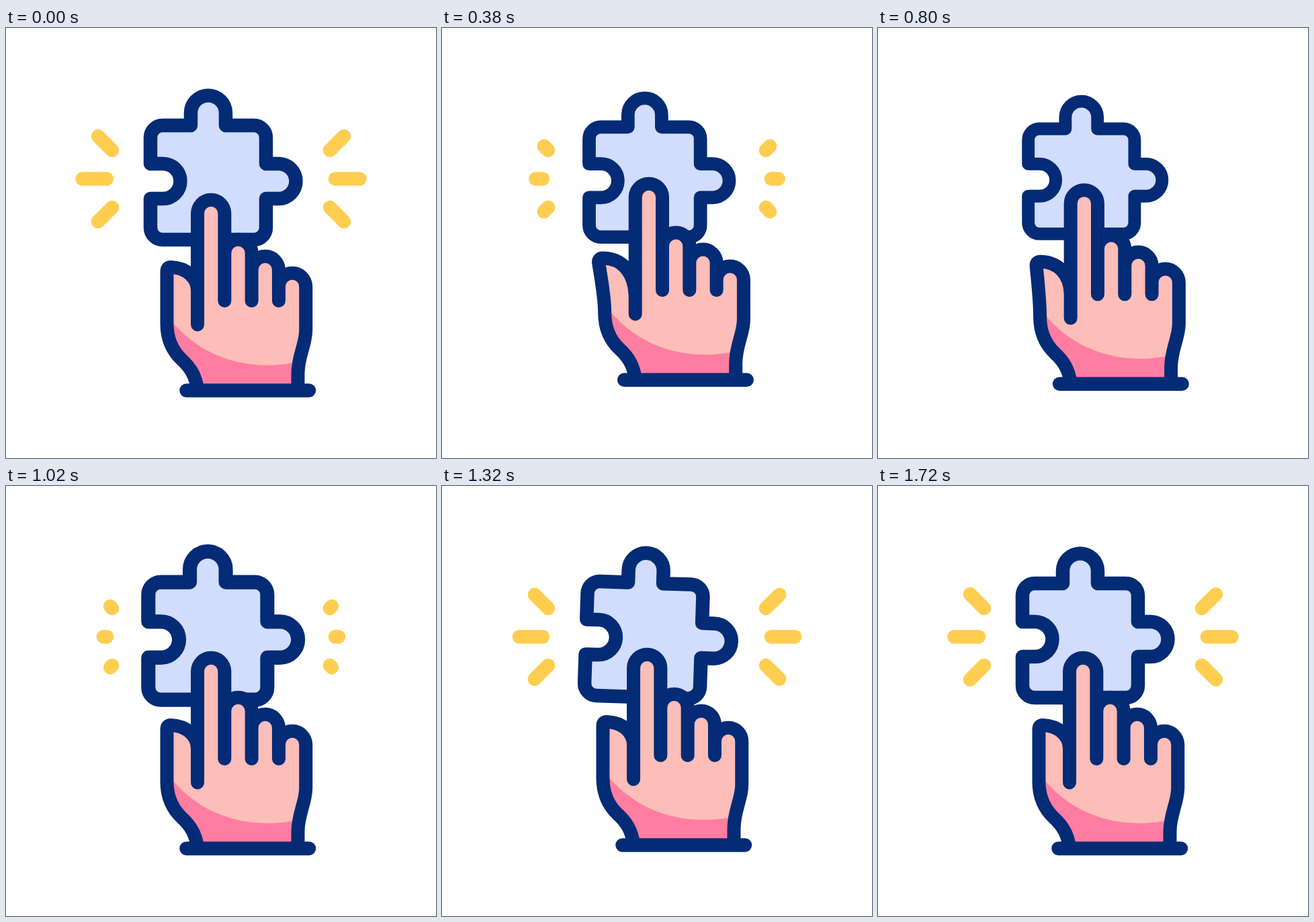
These frames come from a looping animation (640x640 px, 2200 ms). An HTML page with a canvas:

```html
<!DOCTYPE html>
<html lang="en">
<head>
<meta charset="utf-8">
<title>Hand and puzzle piece</title>
<style>
  html, body { margin: 0; width: 100%; height: 100%; overflow: hidden; background: #fff; }
  canvas { display: block; width: 100vmin; height: 100vmin; }
</style>
</head>
<body>
<canvas id="stage"></canvas>
<script>
const LOOP = 2200, SIZE = 640;
const NAVY = '#032b76', PIECE = '#d2dcfd', YELLOW = '#ffcd50', SKIN = '#fdbdb8', SHADE = '#ff7da0';
const PI = Math.PI;

const canvas = document.getElementById('stage');
const ctx = canvas.getContext('2d');

// Progress from 0 to 1 between two times, slightly eased at both ends.
function ramp(t, from, to) {
  const x = Math.min(1, Math.max(0, (t - from) / (to - from)));
  return 0.75 * x + 0.25 * x * x * (3 - 2 * x);
}

// Rises to 1 at the peak and falls back to 0.
const pulse = (t, from, peak, to) => ramp(t, from, peak) - ramp(t, peak, to);

function stroke(path, color, width) {
  ctx.strokeStyle = color;
  ctx.lineWidth = width;
  ctx.stroke(path);
}

function fill(path, color) {
  ctx.fillStyle = color;
  ctx.fill(path);
}

function piecePath() {
  const p = new Path2D();
  const left = 215, right = 387, top = 145, bottom = 315;
  const midX = (left + right) / 2, midY = 228, knob = 26, corner = 18, out = 18.5;
  p.moveTo(left, midY - knob);
  p.arcTo(left, top, midX, top, corner);
  p.lineTo(midX - knob, top);
  p.arc(midX, top - out, knob, PI, 0);
  p.lineTo(midX + knob, top);
  p.arcTo(right, top, right, midY, corner);
  p.lineTo(right, midY - knob);
  p.arc(right + out, midY, knob, -PI / 2, PI / 2);
  p.lineTo(right, midY + knob);
  p.arcTo(right, bottom, midX, bottom, corner);
  p.arcTo(left, bottom, left, midY, corner);
  p.lineTo(left, midY + knob);
  p.arc(left + out, midY, knob, PI / 2, -PI / 2, true);
  p.closePath();
  return p;
}

const piece = piecePath();
const shade = new Path2D('M240 428 C278 480 348 517 440 496 V540 H230 V428 Z');
const cuff = new Path2D('M268.5 539.5 H451');

// The reach stretches the index finger, curls the others and leans the thumb.
function handPath(reach) {
  const p = new Path2D();
  const r = 20.15, index = 305.2, inner = index - r;

  p.moveTo(285, 537);
  p.bezierCurveTo(282, 518, 275, 506, 262, 494);
  p.bezierCurveTo(247, 480, 239.5, 463, 239.5, 440);

  const tipX = 239.5 - 16.5 * reach, tipY = 362 + 9 * reach;
  p.bezierCurveTo(239.5, 417, tipX + 8 * reach, tipY + 26, tipX, tipY);
  p.quadraticCurveTo(tipX - 3.5 * reach, tipY - 6.5 - 4.5 * reach, tipX + 6.5 + 1.5 * reach, tipY - 6 - 4.5 * reach);
  p.bezierCurveTo(268 - 6 * reach, 357 + 4 * reach, inner - 2.5 * reach, 371 + 14 * reach, inner, 391 + 44 * reach);
  p.lineTo(inner, 441.5);

  for (let i = 0; i < 4; i++) {
    const x = index + i * 2 * r;
    const y = i ? 310 + 25 * i + 10.3 * reach : 276 - 15.5 * reach;
    p.arc(x, y, r, PI, 0);
    p.lineTo(x + r, i < 3 ? 406 : 450);
  }
  p.bezierCurveTo(446, 472, 434.5, 488, 434.5, 515);
  p.lineTo(434.5, 537);
  return p;
}

function drawRays(grow) {
  if (grow <= 0) return;
  const rays = new Path2D();
  for (const side of [-1, 1]) {
    for (const row of [-1, 0, 1]) {
      const x = row ? 162 : 170, y = 224.5 + 42.5 * row;
      const dx = row ? 21 : 36.5, dy = 21 * row;
      rays.moveTo(320 + side * x, y);
      rays.lineTo(320 + side * (x + dx * grow), y + dy * grow);
    }
  }
  stroke(rays, YELLOW, 20.5);
}

function drawPiece(scale, degrees) {
  ctx.save();
  ctx.translate(323.5, 207.5);
  ctx.rotate(degrees * PI / 180);
  ctx.scale(scale, scale);
  ctx.translate(-323.5, -207.5);
  fill(piece, PIECE);
  stroke(piece, NAVY, 20.5);
  ctx.restore();
}

function drawHand(reach, lift) {
  const hand = handPath(reach);
  ctx.save();
  ctx.translate(5 * reach, -29.5 * reach - lift);
  fill(hand, SKIN);
  ctx.save();
  ctx.clip(hand);
  fill(shade, SHADE);
  ctx.restore();
  stroke(hand, NAVY, 20);
  stroke(cuff, NAVY, 20.5);
  ctx.restore();
}

function draw(t) {
  const unit = canvas.width / SIZE;
  ctx.setTransform(unit, 0, 0, unit, 0, 0);
  ctx.fillStyle = '#fff';
  ctx.fillRect(0, 0, SIZE, SIZE);
  ctx.lineCap = ctx.lineJoin = 'round';

  const shrink = 0.08 * (ramp(t, 138, 660) - ramp(t, 860, 960));
  const pop = 0.07 * pulse(t, 860, 960, 1067);
  drawRays(1 - ramp(t, 230, 450) + ramp(t, 960, 1340));
  drawPiece(1 - shrink + pop, 2.75 * pulse(t, 1050, 1460, 1720));
  drawHand(1.163 * pulse(t, 138, 660, 862), 11 * pulse(t, 1200, 1460, 1720));
}

function resize() {
  const side = Math.min(innerWidth, innerHeight) || SIZE;
  canvas.width = canvas.height = Math.round(side * (window.devicePixelRatio || 1));
}

const start = performance.now();
function tick() {
  draw((performance.now() - start) % LOOP);
  requestAnimationFrame(tick);
}

addEventListener('resize', resize);
resize();
tick();
</script>
</body>
</html>
```
